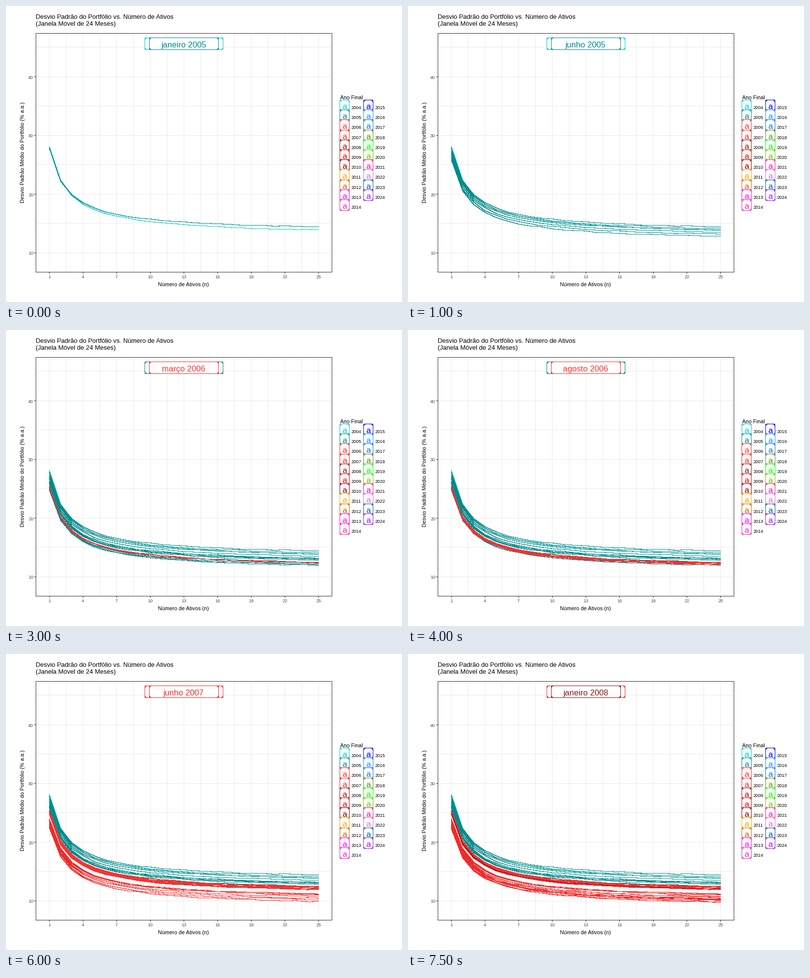
Animation of 800x600 px, one loop 8000 ms. Source, as a matplotlib script:

```python
import numpy as np
import matplotlib.pyplot as plt
from matplotlib.animation import FuncAnimation
from matplotlib.patches import FancyBboxPatch, Rectangle

plt.rcParams["font.family"] = "Liberation Sans"
W, H, DPI = 800, 600, 100
FRAMES, INTERVAL = 16, 500
PX = 72 / DPI
# Half-pixel aliased strokes centred on pixels come out exactly one pixel wide.
STROKE = dict(lw=0.5 * PX, antialiased=False, snap=False)

MONTHS = ("janeiro fevereiro março abril maio junho julho agosto "
          "setembro outubro novembro dezembro").split()
COLORS = ("#00CED1 #008B8B #FF3030 #EE2C2C #8B1A1A #EE0000 #8B0000 "
          "#FFA500 #CD6600 #FF00FF #EE30A7 #0000EE #1E90FF #1874CD "
          "#698B22 #00FF00 #66CD00 #FF1493 #DA70D6 #00688B #A020F0").split()

# Long-run risk level, by months since December 2004.
LEVEL_MONTH = [0, 1, 3, 6, 8, 10, 14, 23, 24, 26, 30, 32, 34, 36, 37]
LEVEL = [13.95, 14.45, 13.9, 12.85, 13.1, 11.95, 12.5, 11.9, 11.2, 11.0, 9.9,
         10.7, 9.75, 10.45, 12.05]

N = np.arange(1, 26)
rng = np.random.default_rng(7)


def px_x(n):
    return 87.5 + (n - 1) * 68 / 3


def px_y(v):
    return 500.5 - (v - 10) * 11.9


def risk_curve(i):
    """Diversification curve sqrt(A + B/n) with a slight early bulge."""
    end = np.interp(i, LEVEL_MONTH, LEVEL)
    start = 11.1 + 1.15 * end + np.exp(-2 * i)
    b = (start ** 2 - (end - 0.07) ** 2) / 0.96
    wiggle = rng.normal(0, 0.05, N.size)
    wiggle[[0, -1]] = 0
    return np.sqrt(start ** 2 - b + b / N) + 1.9 * (N - 1) / N ** 2 + wiggle


fig = plt.figure(figsize=(W / DPI, H / DPI), dpi=DPI, facecolor="white")
ax = fig.add_axes([0, 0, 1, 1])
ax.set_xlim(0, W)
ax.set_ylim(H, 0)
ax.axis("off")


def line(x, y, color, z=1):
    return ax.plot(x, y, color=color, zorder=z, solid_capstyle="butt", **STROKE)[0]


def pixel_curve(values, color, z):
    """Plot a curve through whole pixels, one per column."""
    x = np.arange(px_x(1), px_x(25) + 0.5)
    y = np.floor(np.interp(x, px_x(N), px_y(values))) + 0.5
    return line(x, y, color, z)


def text(x, y, s, size, color="black", ha="left", z=5, **kw):
    return ax.text(x, y, s, fontsize=size * PX, color=color, ha=ha,
                   va=kw.pop("va", "baseline"), zorder=z, **kw)


def rounded(x, y, w, h, color, z):
    box = FancyBboxPatch((x, y), w, h, boxstyle="round,pad=0,rounding_size=4",
                         fc="white", ec=color, zorder=z, **STROKE)
    return ax.add_patch(box)


def draw_panel():
    for n in np.arange(1, 25.1, 1.5):
        line([px_x(n)] * 2, [56, 539], "#EBEBEB")
    for v in range(10, 50, 5):
        y = np.floor(px_y(v) - 0.1) + 0.5
        line([61, 658], [y, y], "#EBEBEB")
    ax.add_patch(Rectangle((60.5, 55.5), 598, 484, fill=False, ec="#333333",
                           zorder=4, **STROKE))
    for n in range(1, 26, 3):
        line([px_x(n)] * 2, [540, 543], "#333333")
        text(px_x(n), 552.5, str(n), 9.2, "#4D4D4D", "center")
    for v in (10, 20, 30, 40):
        line([57, 60], [px_y(v)] * 2, "#333333")
        text(55.3, px_y(v) + 4, str(v), 9.2, "#4D4D4D", "right")
    text(60, 26, "Desvio Padrão do Portfólio vs. Número de Ativos", 12.85)
    text(60, 40, "(Janela Móvel de 24 Meses)", 12.85)
    text(358.7, 568, "Número de Ativos (n)", 10.9, ha="center")
    text(39.5, 296.5, "Desvio Padrão Médio do Portfólio (% a.a.)", 10.9,
         ha="right", va="center", rotation=90)


def draw_legend():
    text(675, 189, "Ano Final", 10.75)
    for i, color in enumerate(COLORS):
        col, row = divmod(i, 11)
        x, y = 674.5 + 48 * col, 190.5 + round(20.2 * row)
        z = 5 + 0.1 * row
        rounded(x, y, 19, 22, color, z)
        text(x + 9, y + 18.5, "a", 16.6, color, "center", z + 0.05)
        text(x + 22.5, y + 18.5, str(2004 + i), 9.1)


def year_index(i):
    return (i + 11) // 12


def month_at(k):
    return int(1.24 + 2.42 * k)


draw_panel()
draw_legend()
lines = [pixel_curve(risk_curve(i), COLORS[year_index(i)], 2 + i / 100)
         for i in range(month_at(FRAMES - 1) + 1)]
outer = rounded(280.5, 64.5, 158, 24, COLORS[0], 6)
inner = rounded(289.5, 64.5, 141, 24, COLORS[1], 7)
label = text(358.8, 84, "", 16.5, ha="center", z=8)


def update(k):
    now = month_at(k)
    for i, ln in enumerate(lines):
        ln.set_visible(i <= now)
    yi = year_index(now)
    month = MONTHS[(now + 11) % 12]
    half = max(70, round(9.875 * len(month)))
    outer.set_edgecolor(COLORS[yi - 1])
    inner.set_edgecolor(COLORS[yi])
    inner.set_x(359.5 - half)
    inner.set_width(2 * half)
    label.set_text(f"{month} {2004 + yi}")
    label.set_color(COLORS[yi])
    return [*lines, outer, inner, label]


anim = FuncAnimation(fig, update, frames=FRAMES, interval=INTERVAL,
                     repeat=True, repeat_delay=0, blit=False)
plt.show()
```
